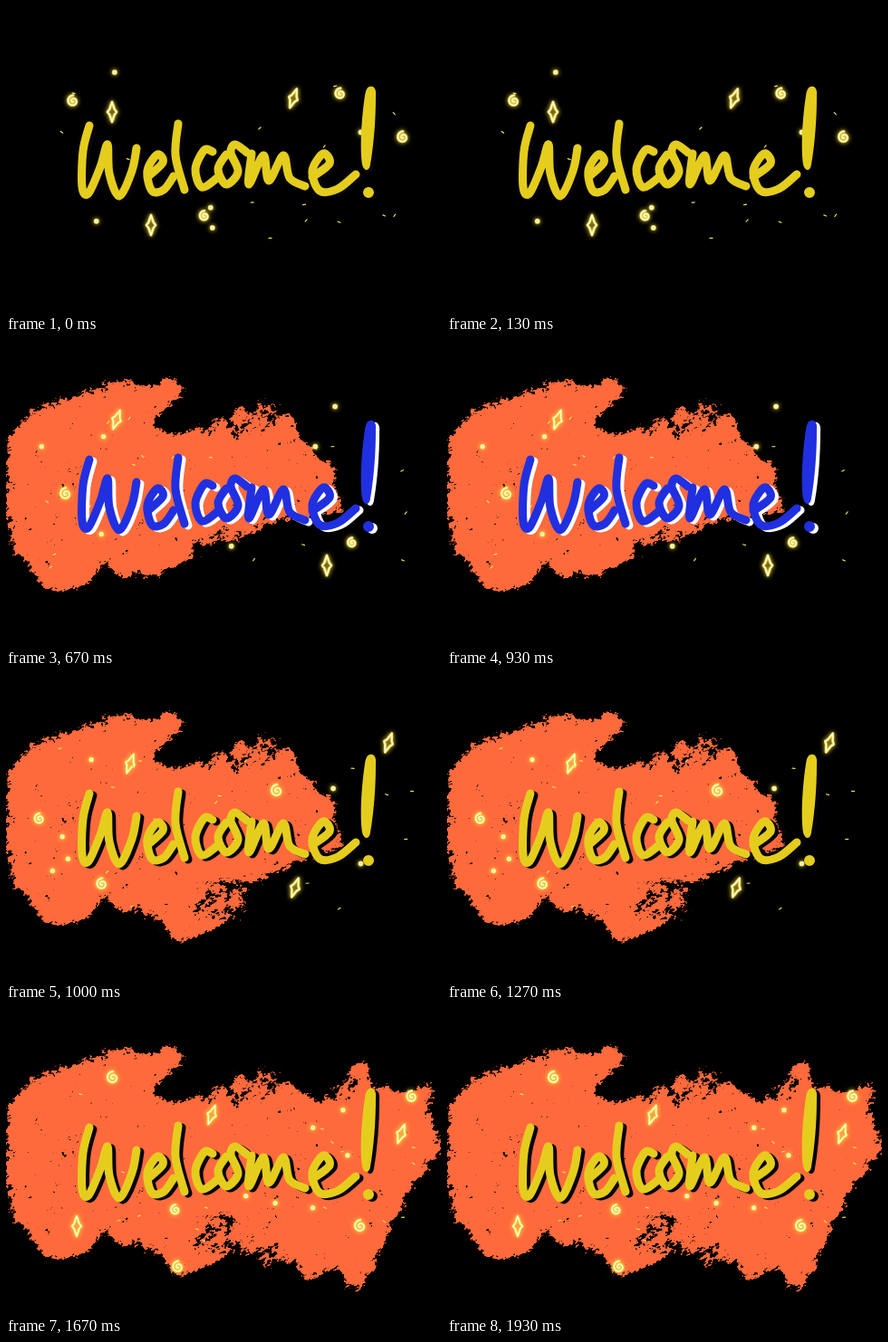
An HTML page with a canvas for the animation above (1990 ms loop, 480 by 338 pixels).

```html
<!DOCTYPE html>
<html lang="en">
<head>
<meta charset="utf-8">
<title>Welcome!</title>
<style>
  html, body { margin: 0; width: 100%; height: 100%; overflow: hidden; background: #000; }
  canvas { display: block; width: 480px; height: 338px; }
</style>
</head>
<body>
<canvas id="stage" width="480" height="338" role="img" aria-label="Welcome!"></canvas>
<script>
const W = 480, H = 338, LOOP = 1990;
const YELLOW = '#e4cd1d', BLUE = '#2030e0', DARK = '#080310', WHITE = '#fff';
const ORANGE = [255, 106, 60];

// Brush strokes, laid down one after another; dry = [x, y, rx, ry] of thin paint
const strokes = [
  { shape: 'M-20 108H4L24 80 97 55 130 43 158 52 181 39 200 55 166 84 163 97 190 104 245 80 248 115 226 150 206 172 222 184 190 225 165 262 122 260 107 244 95 268 48 281 11 232 4 208H-20Z',
    dry: [[234, 110, 24, 34], [206, 172, 18, 36]] },
  { shape: 'M163 97L190 109 245 79 279 62 319 86 323 105 362 145 368 190 322 199 215 233 165 262 140 200Z',
    dry: [[265, 86, 52, 20], [270, 216, 75, 15]] },
  { shape: 'M107 244L121 258 168 268 186 297 221 286 271 261 266 237 326 206 366 194 340 160 180 180Z',
    dry: [[245, 248, 46, 24]] },
  { shape: 'M318 86L345 109 385 104 422 107 471 82 440 142 411 177 402 209 328 263 331 238 272 262 250 230 300 150Z',
    dry: [[365, 110, 28, 9], [435, 125, 24, 22]] },
  { shape: 'M318 88L335 109 371 85 385 61 398 54 400 86 441 93 472 81 465 110 482 154 446 200 421 250 396 311 375 305 365 285 325 305 325 280 288 286 260 268 260 200Z',
    dry: [[282, 274, 30, 12], [365, 88, 26, 14]] }
];

// Each stage shows its number of strokes; sparks: S spiral, D star, d leaning star
const stages = [
  { at: 0, ink: YELLOW, shade: DARK, sparks: 'S74 105,D117 117,D160 242,S219 232,d317 102,S369 97,S438 145' },
  { at: 330, ink: YELLOW, shade: DARK, sparks: 'S134 118,d55 162,S178 240,d314 113,S430 140' },
  { at: 670, ink: BLUE, shade: WHITE, sparks: 'd122 88,S66 170,S382 224,D354 249' },
  { at: 1000, ink: YELLOW, shade: DARK, sparks: 'd137 99,S299 129,S37 160,S106 232,d422 76,d319 236' },
  { at: 1330, ink: BLUE, shade: WHITE, sparks: 'S142 91,d79 115,S358 134,S175 235,d304 212' },
  { at: 1670, ink: YELLOW, shade: DARK, sparks: 'S118 77,d227 118,S448 98,d436 139,S187 223,S391 241,S190 286,D78 241' }
];

// A few points along each pen stroke
const letters = [
  '92 132,85 160,84 200,91 207,104 178,112 153,114 185,125 210,139 182,144 157',
  '156 189,173 173,167 164,156 182,161 204,174 203,185 188',
  '190 130,187 165,197 203',
  '228 161,219 159,209 180,216 200,233 190',
  '243 164,234 180,243 197,256 183,248 162,253 153,266 162',
  '271 163,268 197,284 165,290 193,306 165,313 190,330 199',
  '338 189,357 174,350 163,338 182,346 204,366 202,386 186'
];

function newCanvas() {
  const c = document.createElement('canvas');
  c.width = W; c.height = H;
  return c;
}

// Smooth curve through every point
function smoothPath(text) {
  const points = text.split(',').map(p => p.split(' ').map(Number));
  const at = i => points[Math.max(0, Math.min(points.length - 1, i))];
  const path = new Path2D();
  path.moveTo(...points[0]);
  for (let i = 0; i < points.length - 1; i++) {
    const [a, b, c, d] = [at(i - 1), at(i), at(i + 1), at(i + 2)];
    path.bezierCurveTo(b[0] + (c[0] - a[0]) / 6, b[1] + (c[1] - a[1]) / 6,
      c[0] - (d[0] - b[0]) / 6, c[1] - (d[1] - b[1]) / 6, c[0], c[1]);
  }
  return path;
}

function hash(x, y) {
  let n = Math.imul(x + 101, 374761393) ^ Math.imul(y + 57, 668265263);
  n = Math.imul(n ^ (n >>> 13), 1274126177);
  return ((n ^ (n >>> 16)) >>> 0) / 4294967296;
}

function valueNoise(x, y) {
  const i = Math.floor(x), j = Math.floor(y);
  const ease = f => f * f * (3 - 2 * f);
  const mix = (a, b, f) => a + (b - a) * f;
  const u = ease(x - i), v = ease(y - j);
  return mix(mix(hash(i, j), hash(i + 1, j), u), mix(hash(i, j + 1), hash(i + 1, j + 1), u), v);
}

// Bristle texture, running up to the right
const grain = new Float32Array(W * H);
for (let i = 0; i < grain.length; i++) {
  const x = i % W, y = Math.floor(i / W);
  const u = x * .9 - y * .45, v = x * .45 + y * .9;
  grain[i] = .35 * valueNoise(u / 2, v / 1.5) + .35 * valueNoise(u / 5, v / 3.5) +
    .3 * valueNoise(u / 14 + 40, v / 9) - .5;
}

function paint(target, count) {
  const mask = newCanvas(), m = mask.getContext('2d');
  for (const { shape, dry } of strokes.slice(0, count)) {
    m.globalCompositeOperation = 'source-over';
    m.fillStyle = '#000';
    m.fill(new Path2D(shape));
    m.globalCompositeOperation = 'destination-out';
    m.fillStyle = 'rgba(0,0,0,.42)';
    for (const [x, y, rx, ry] of dry) {
      m.beginPath();
      m.ellipse(x, y, rx, ry, -.2, 0, 7);
      m.fill();
    }
  }
  const c = newCanvas(), g = c.getContext('2d', { willReadFrequently: true });
  g.filter = 'blur(4.5px)';
  g.drawImage(mask, 0, 0);
  const image = g.getImageData(0, 0, W, H), px = image.data;
  for (let i = 0; i < grain.length; i++) {
    const cover = px[i * 4 + 3] / 255;
    const level = cover < .05 ? -1 : cover - .52 + grain[i] * 1.5;
    px.set(ORANGE, i * 4);
    px[i * 4 + 3] = 255 * Math.max(0, Math.min(1, level * 8 + .5));
  }
  g.putImageData(image, 0, 0);
  target.drawImage(c, 0, 0);
}

function sparkPath(kind, x, y) {
  const p = new Path2D();
  if (kind === 'S') {
    const r = 6 + 2 * hash(x, y);
    for (let a = 0; a <= 10; a += .25) {
      const d = r * (.1 + .08 * a);
      p.lineTo(x + d * Math.cos(a + 1), y + d * Math.sin(a + 1));
    }
    return p;
  }
  const tilt = kind === 'd' ? .35 : 0;
  for (let i = 0; i < 8; i++) {
    const a = tilt + i * Math.PI / 4;
    const d = i % 2 ? 4 : i % 4 ? 5 : 11;
    p.lineTo(x + d * Math.sin(a), y - d * Math.cos(a));
  }
  p.closePath();
  return p;
}

function glow(g, path) {
  g.shadowColor = '#ffe03c';
  g.shadowBlur = 5;
  g.lineWidth = 3;
  g.strokeStyle = '#e9d348';
  g.stroke(path);
  g.shadowBlur = 0;
  g.lineWidth = 1.5;
  g.strokeStyle = '#fffbd0';
  g.stroke(path);
}

function drawSparks(g, list, seed) {
  for (const item of list.split(',')) {
    glow(g, sparkPath(item[0], ...item.slice(1).split(' ').map(Number)));
  }
  // loose dots and flecks around the word
  for (let i = 0; i < 24; i++) {
    const x = 30 + 420 * hash(i, seed * 7), y = 70 + 190 * hash(i + 50, seed * 7);
    const p = new Path2D();
    if (i < 6) {
      p.arc(x, y, 1.5, 0, 7);
      glow(g, p);
    } else {
      const a = 1.8 * hash(i, seed) - 1;
      p.moveTo(x, y);
      p.lineTo(x + 3 * Math.cos(a), y + 3 * Math.sin(a));
      g.lineWidth = 1.2;
      g.strokeStyle = '#f0dc58';
      g.stroke(p);
    }
  }
}

const letterPaths = letters.map(smoothPath);
const bang = new Path2D('M402 89C406 88 409 92 408 100C408 125 406 151 402 175C401 183 395 183 393 175C390 153 393 119 396 99C397 92 399 89 402 89Z');
bang.addPath(new Path2D('M394 206a6 6 0 1 0 12 0a6 6 0 1 0 -12 0Z'));

function drawWord(g, color, dx, dy) {
  g.save();
  g.translate(dx, dy);
  g.strokeStyle = g.fillStyle = color;
  g.lineWidth = 9;
  letterPaths.forEach(path => g.stroke(path));
  g.fill(bang);
  g.restore();
}

const pictures = stages.map((stage, i) => {
  const c = newCanvas(), g = c.getContext('2d');
  g.lineCap = g.lineJoin = 'round';
  g.fillStyle = '#000';
  g.fillRect(0, 0, W, H);
  paint(g, i);
  drawSparks(g, stage.sparks, i + 1);
  drawWord(g, stage.shade, 4, 2);
  drawWord(g, stage.ink, 0, 0);
  return c;
});

const screen = document.getElementById('stage').getContext('2d');
const start = performance.now();

function render() {
  const time = (performance.now() - start) % LOOP;
  const index = stages.filter(stage => stage.at <= time).length - 1;
  screen.drawImage(pictures[index], 0, 0);
  requestAnimationFrame(render);
}
render();
</script>
</body>
</html>
```
